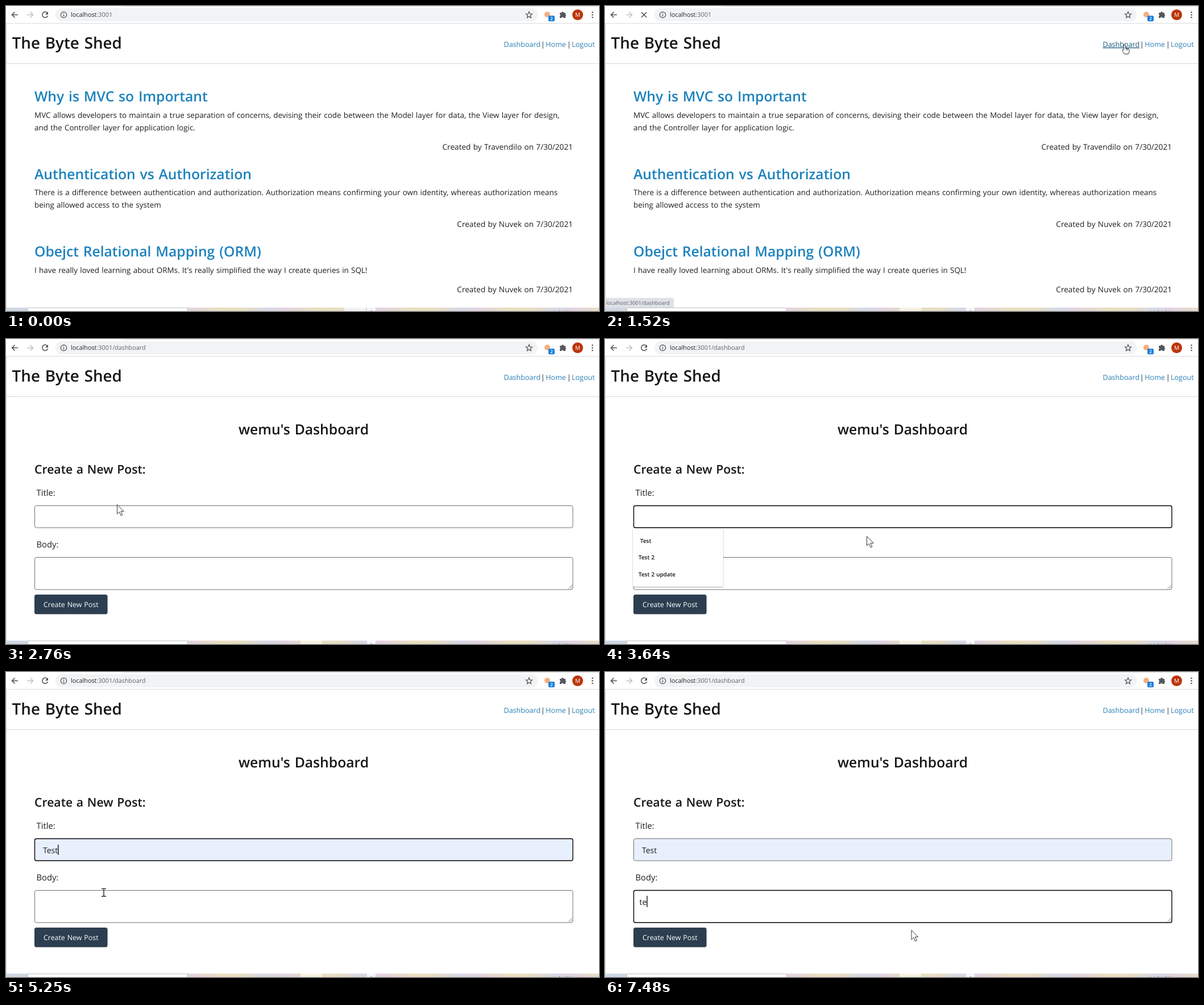
These frames come from a looping animation (1043x537 px, 8000 ms). An HTML page:

```html
<!DOCTYPE html>
<html lang="en">
<head>
<meta charset="utf-8">
<title>Blog dashboard</title>
<style>
  html, body { margin: 0; width: 100%; height: 100%; overflow: hidden; background: #fff; }
  svg { display: block; }
  text {
    font: 13.45px "Open Sans", "Noto Sans", sans-serif;
    fill: #1c1f23; word-spacing: .056em; white-space: pre;
    text-rendering: geometricPrecision;
  }
  .h1 { font-size: 27.8px; font-weight: 600; fill: #161616; }
  .h2 { font-size: 24.7px; font-weight: 600; fill: #161616; }
  .h3 { font-size: 21.2px; font-weight: 600; fill: #161616; }
  .post { fill: #1c82bc; }
  .by { font-size: 13.65px; text-anchor: end; }
  .nav { font-size: 12.55px; }
  .link { fill: #2a80b6; }
  .bar { text-anchor: middle; }
  .label { font-size: 14.8px; }
  .value { font-size: 14px; }
  .preview { font: 11px "Liberation Sans", Arial, sans-serif; }
  .option { font-size: 9.9px; font-weight: 600; fill: #111; }
  .url { font-size: 10.85px; fill: #202124; }
  .url tspan { fill: #5f6368; }
  .icon { fill: none; stroke: #4b4f54; stroke-width: 1.5; }
</style>
</head>
<body>
<svg width="1043" height="537" viewBox="0 0 1043 537">
  <defs>
    <linearGradient id="wall" gradientUnits="userSpaceOnUse" x1="319" x2="489" spreadMethod="repeat">
      <stop offset="0" stop-color="#e2d3e0"/>
      <stop offset=".35" stop-color="#e8dfbf"/>
      <stop offset=".6" stop-color="#e6dcc6"/>
      <stop offset=".8" stop-color="#d5d8e6"/>
      <stop offset="1" stop-color="#e2d3e0"/>
    </linearGradient>
    <filter id="shadow" x="-10%" y="-10%" width="120%" height="125%">
      <feDropShadow dx="0" dy="1" stdDeviation="1.3" flood-opacity=".35"/>
    </filter>
  </defs>

  <!-- browser bar -->
  <path d="M205 .5H1043" stroke="#dfe1e5"/>
  <path d="M0 30.5H1043" stroke="#d9dbde"/>
  <rect x="87" y="4" width="848" height="23" rx="11.5" fill="#f1f3f4"/>
  <path class="icon" d="M21 15.5H11M15.5 10.5L10.5 15.5L15.5 20.5"/>
  <path class="icon" style="stroke:#bfc2c6" d="M37 15.5H47M42.5 10.5L47.5 15.5L42.5 20.5"/>
  <g id="reload">
    <path class="icon" d="M72.6 12A5 5 0 1 0 73.6 17"/>
    <path d="M74 10V15H69Z" fill="#4b4f54"/>
  </g>
  <path id="stop" class="icon" d="M64 11L73 20M73 11L64 20"/>
  <circle class="icon" cx="101.5" cy="15.5" r="5.2" style="stroke-width:1.2"/>
  <path d="M101.5 14.6V18.4M101.5 12.3V13.6" stroke="#4b4f54" stroke-width="1.2"/>
  <text class="url" x="114" y="19.3">localhost<tspan>:3001</tspan><tspan id="path">/dashboard</tspan></text>
  <path class="icon" style="stroke-width:1.2" d="M920 10L921.5 13.8L925.5 14.1L922.4 16.7L923.4 20.6L920 18.4L916.6 20.6L917.6 16.7L914.5 14.1L918.5 13.8Z"/>
  <circle cx="952" cy="15" r="5" fill="#f4ae80"/>
  <rect x="954" y="17" width="11" height="10" rx="2" fill="#1b7fdc"/>
  <text x="959.5" y="25" text-anchor="middle" style="font-size:8px;font-weight:600;fill:#fff">2</text>
  <path fill="#54585d" d="M974 12H977A2 2 0 0 1 981 12H984V15A2 2 0 0 1 984 18.5V21H980.5A1.8 1.8 0 0 0 977 21H974V17.8A1.8 1.8 0 0 0 974 14.5Z"/>
  <circle cx="1005.5" cy="15.5" r="9.5" fill="#bb360c"/>
  <text x="1005.5" y="19.2" text-anchor="middle" style="font-size:10px;fill:#fff">M</text>
  <g fill="#4b4f54">
    <circle cx="1031.5" cy="11" r="1.3"/><circle cx="1031.5" cy="15.5" r="1.3"/><circle cx="1031.5" cy="20" r="1.3"/>
  </g>

  <!-- site header -->
  <path d="M.5 31V531" stroke="#d4d4d6"/>
  <path d="M0 101.5H1043" stroke="#d8d8d8"/>
  <text class="h1" x="10.5" y="75">The Byte Shed</text>
  <text class="nav link" id="dash" x="875.5" y="72">Dashboard</text>
  <text class="nav bar" x="944.3" y="72">|</text>
  <text class="nav link" x="949.3" y="72">Home</text>
  <text class="nav bar" x="990.2" y="72">|</text>
  <text class="nav link" x="995" y="72">Logout</text>

  <g id="home">
    <text class="h2 post" x="50" y="168">Why is MVC so Important</text>
    <text x="50" y="197">MVC allows developers to maintain a true separation of concerns, devising their code between the Model layer for data, the View layer for design,</text>
    <text x="50" y="218.5">and the Controller layer for application logic.</text>
    <text class="by" x="997" y="253">Created by Travendilo on 7/30/2021</text>
    <text class="h2 post" x="50" y="304.5">Authentication vs Authorization</text>
    <text x="50" y="333.3">There is a difference between authentication and authorization. Authorization means confirming your own identity, whereas authorization means</text>
    <text x="50" y="354.8">being allowed access to the system</text>
    <text class="by" x="997" y="389.3">Created by Nuvek on 7/30/2021</text>
    <text class="h2 post" x="50" y="441">Obejct Relational Mapping (ORM)</text>
    <text x="50" y="469.6">I have really loved learning about ORMs. It's really simplified the way I create queries in SQL!</text>
    <text class="by" x="997" y="504.3">Created by Nuvek on 7/30/2021</text>
  </g>

  <g id="form">
    <text class="h2" x="523.5" y="168" text-anchor="middle">wemu's Dashboard</text>
    <text class="h3" x="50" y="237">Create a New Post:</text>
    <text class="label" x="53.5" y="276">Title:</text>
    <rect id="title" x="50.5" y="293.5" width="946.5" height="38.7" rx="3"/>
    <text class="preview" id="preview" x="60.5" y="319"></text>
    <text class="value" id="chosen" x="65" y="318.7">Test</text>
    <text class="label" x="53.5" y="367">Body:</text>
    <rect id="body" x="50.5" y="384.5" width="946.5" height="56.7" rx="3" fill="#fff"/>
    <path d="M989.5 439.5L996 433M993 439.5L996 436.5" stroke="#808080"/>
    <text class="value" id="typed" x="60.5" y="410"></text>
    <rect id="caret" width="1.3" fill="#000"/>
    <rect x="50" y="450" width="128.6" height="34.5" rx="3.5" fill="#2c3e50"/>
    <text x="66" y="472" style="font-size:12.4px;fill:#fff">Create New Post</text>
    <g id="menu">
      <path d="M49 333.5H208V433a3 3 0 0 1-3 3H52a3 3 0 0 1-3-3Z" fill="#fff" filter="url(#shadow)"/>
      <rect id="row" x="49" width="159" height="29.5" fill="#e8e8e8"/>
      <text class="option" x="62" y="358.5">Test</text>
      <text class="option" x="59" y="388">Test 2</text>
      <text class="option" x="59" y="417.5">Test 2 update</text>
    </g>
  </g>

  <!-- desktop strip and status bubble -->
  <rect y="531" width="1043" height="6" fill="url(#wall)"/>
  <rect y="531" width="38" height="6" fill="#cfd8e2"/>
  <path d="M38.5 540V531.5H319.5V540" fill="#fff" stroke="#bfc3c8"/>
  <rect id="tile" y="531" width="38" height="6"/>
  <rect x="635" y="531" width="15" height="6" fill="#f6f5f8"/>
  <path d="M641 537L642.5 535L644 537" fill="#999"/>
  <text x="958" y="542.5" style="font-size:9px">11:24 PM</text>
  <g id="status">
    <path d="M0 514H118a3 3 0 0 1 3 3V531H0Z" fill="#dee1e6"/>
    <text x="2" y="526" style="font-size:9.2px;fill:#5f6368">localhost:3001/dashboard</text>
  </g>

  <!-- pointers, each with its hotspot at 0,0 -->
  <g id="pointer" stroke="#222" stroke-width=".9" fill="#fff">
    <path id="arrow" d="M.5 .5V17L4.3 13.4L7.2 20L9.8 18.9L7 12.4H12.2Z"/>
    <path id="hand" d="M-1.4 9V1a1.4 1.4 0 0 1 2.8 0V6.5L7 7.7Q8.5 8 8.4 9.5Q8.3 13 6.5 16.5H-.8Q-2 13.5 -4 11Q-4.8 9.2 -3.2 8.8Q-2.2 8.8 -1.4 10.5M3 7V10M5.4 7.5V10"/>
    <path id="beam" fill="none" stroke-width="1.4" d="M-4 -6.7H-1.2L0 -6L1.2 -6.7H4M0 -6V6.2M-4 6.9H-1.2L0 6.2L1.2 6.9H4"/>
  </g>
</svg>
<script>
const LOOP = 8000, CLICK_LINK = 1320, LOADING = 1450, LOADED = 1660;
const FOCUS_TITLE = 3030, MENU_OPEN = 3100, CHOOSE = 4970, FOCUS_BODY = 5660;
const OPTIONS = ["Test", "Test 2", "Test 2 update"];
const MENU_TOP = 340, ROW = 29.5;

// time, x, y
const ROUTE = [
  [400, 1011, 480], [1120, 914, 68], [LOADED, 914, 68], [2000, 482, 270], [2070, 425, 281],
  [2350, 224, 291], [2630, 224, 291], [2760, 195, 291], [2970, 195, 291], [FOCUS_TITLE, 192, 312],
  [3170, 192, 312], [3430, 450, 340], [3640, 460, 347], [4100, 460, 347], [4300, 194, 375],
  [4520, 165, 412], [4900, 170, 354], [CHOOSE, 170, 354], [5250, 172, 388], [5520, 180, 405],
  [FOCUS_BODY, 180, 405], [6200, 538.5, 454]
];

const $ = id => document.getElementById(id);
const show = (id, on) => $(id).style.display = on ? "" : "none";
const set = (id, attrs) => { for (const k in attrs) $(id).setAttribute(k, attrs[k]); };
const within = (t, ...spans) => spans.some(([a, b]) => t >= a && t < b);

function pointerAt(t) {
  const next = ROUTE.findIndex(p => p[0] > t);
  if (next < 1) return ROUTE[next ? ROUTE.length - 1 : 0].slice(1);
  const [t0, x0, y0] = ROUTE[next - 1], [t1, x1, y1] = ROUTE[next];
  const k = (t - t0) / (t1 - t0);
  return [x0 + (x1 - x0) * k, y0 + (y1 - y0) * k];
}

function outline(id, focused) {
  set(id, { stroke: focused ? "#000" : "#707070", "stroke-width": focused ? 1.4 : 1 });
}

function drawCaret(t, typed) {
  const inBody = t >= FOCUS_BODY;
  show("caret", within(t, [FOCUS_TITLE, 3570], [4100, 4630], [CHOOSE, 5510], [FOCUS_BODY, 6190], [6750, LOOP]));
  set("caret", inBody
    ? { x: [60.3, 65.5, 73.4][typed.length], y: 394, height: 20 }
    : { x: t < CHOOSE ? 60 : 91.2, y: 304, height: 18 });
}

function draw(t) {
  const [x, y] = pointerAt(t);
  const loaded = t >= LOADED, chosen = t >= CHOOSE;
  const menu = within(t, [MENU_OPEN, CHOOSE]);
  const overMenu = menu && x > 49 && x < 208 && y > 334 && y < 436;
  const row = overMenu ? Math.floor((y - MENU_TOP) / ROW) : -1;
  const overLink = t >= 400 && x > 876 && x < 939 && y > 60 && y < 76;
  const overField = loaded && !overMenu && (y > 293 && y < 333 || y > 384 && y < 442);

  show("home", !loaded);
  show("form", loaded);
  show("path", loaded);
  show("status", within(t, [CLICK_LINK, LOADED]));
  const loading = within(t, [LOADING, LOADED]);
  show("stop", loading);
  show("reload", !loading);
  set("tile", t < LOADING ? { x: 595, fill: "#f4f2f4" } : { x: 518, fill: "#f6f2e2" });
  $("dash").style.fill = overLink ? "#17587f" : "";
  $("dash").style.textDecoration = overLink ? "underline" : "none";

  outline("title", within(t, [FOCUS_TITLE, FOCUS_BODY]));
  outline("body", t >= FOCUS_BODY);
  set("title", { fill: chosen || row >= 0 ? "#e8f0fe" : "#fff" });
  $("preview").textContent = OPTIONS[row] || "";
  show("chosen", chosen);
  show("menu", menu);
  show("row", row >= 0);
  set("row", { y: MENU_TOP - .5 + row * ROW });

  const typed = "te".slice(0, (t >= 7280) + (t >= 7480));
  $("typed").textContent = typed;
  drawCaret(t, typed);

  show("pointer", t >= 400);
  set("pointer", { transform: `translate(${x} ${y})` });
  show("hand", overLink);
  show("beam", overField);
  show("arrow", !overLink && !overField);
}

const start = performance.now();
function tick() {
  draw((performance.now() - start) % LOOP);
  requestAnimationFrame(tick);
}
tick();
</script>
</body>
</html>
```
